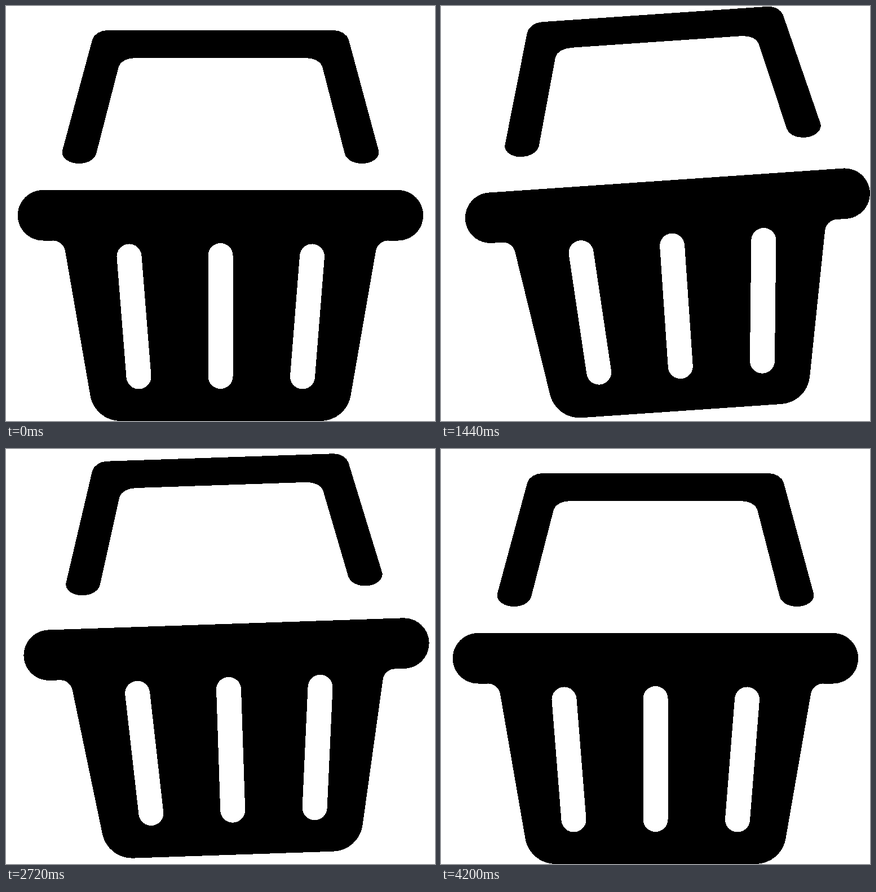
Recreate the animation shown at these times as an HTML page. Size 761 by 735 pixels, loop 5.24 s.

```html
<!DOCTYPE html>
<html lang="en">
<head>
<meta charset="utf-8">
<title>Swinging basket</title>
<style>
  html, body { margin: 0; width: 100%; height: 100%; overflow: hidden; background: #fff; }
  svg { display: block; width: 100%; height: 100%; shape-rendering: crispEdges; }
  #slots { fill: none; stroke: #fff; stroke-width: 44; stroke-linecap: round; }
</style>
</head>
<body>
<svg viewBox="0 0 761 735">
  <path id="handle" d="M180 43H581C594 43 605 50 608 60L661 256C664 268 650 279 632 279
    C616 279 604 272 601 262L561 107C558 98 546 92 531 92H230C215 92 203 98 200 107
    L160 262C157 272 145 279 129 279C111 279 97 268 100 256L153 60C156 50 167 43 180 43Z"/>
  <path id="basket" d="M65.5 326H695.5A44.5 44.5 0 0 1 695.5 415.5H678A22 22 0 0 0 656 434
    L611.5 690A54 54 0 0 1 558 735H203A54 54 0 0 1 149.5 690L105 434A22 22 0 0 0 83 415.5H65.5
    A44.5 44.5 0 0 1 65.5 326Z"/>
  <path id="slots" d="M218.5 443.5L235.5 656.5M380.5 442V656M543 443.5L526 656.5"/>
</svg>
<script>
  const LOOP = 5240, ACTIVE = 4200, STEP = 40;
  const HALF_SWING = 1000 / 3, FIRST_PEAK = 3250 / 3;
  const peaks = [4, -4, 3, -3, 2, -2, 1];
  const swingKeys = [
    [600, 0],
    ...peaks.map((angle, i) => [FIRST_PEAK + i * HALF_SWING, angle]),
    [3600, 0]
  ];

  // The slots hang from a higher pivot, so they slide slightly inside the basket
  const parts = [
    { id: "handle", pivot: "368 41", height: 27.6, start: 280, end: 640 },
    { id: "basket", pivot: "370 41", height: 15.6, start: 200, end: 600 },
    { id: "slots", pivot: "370 -8", height: 15.6, start: 200, end: 600 }
  ].map(part => ({ ...part, node: document.getElementById(part.id) }));

  // Sine ease from 0 to 1 between two times
  const ease = (time, start, end) => {
    const p = Math.min(1, Math.max(0, (time - start) / (end - start)));
    return (1 - Math.cos(Math.PI * p)) / 2;
  };

  const angleAt = time => swingKeys.slice(1).reduce((angle, [end, value], i) => {
    const [start, from] = swingKeys[i];
    return angle + (value - from) * ease(time, start, end);
  }, 0);

  function draw(now) {
    const time = Math.min(ACTIVE, Math.floor((now % LOOP) / STEP) * STEP);
    const angle = angleAt(time);
    const liftTime = Math.min(time, ACTIVE - time); // lowering mirrors lifting
    for (const { node, pivot, height, start, end } of parts) {
      const y = -height * ease(liftTime, start, end);
      node.setAttribute("transform", `rotate(${angle} ${pivot}) translate(0 ${y})`);
    }
  }

  const begin = performance.now();
  function tick() {
    draw(performance.now() - begin);
    requestAnimationFrame(tick);
  }
  tick();
</script>
</body>
</html>
```
